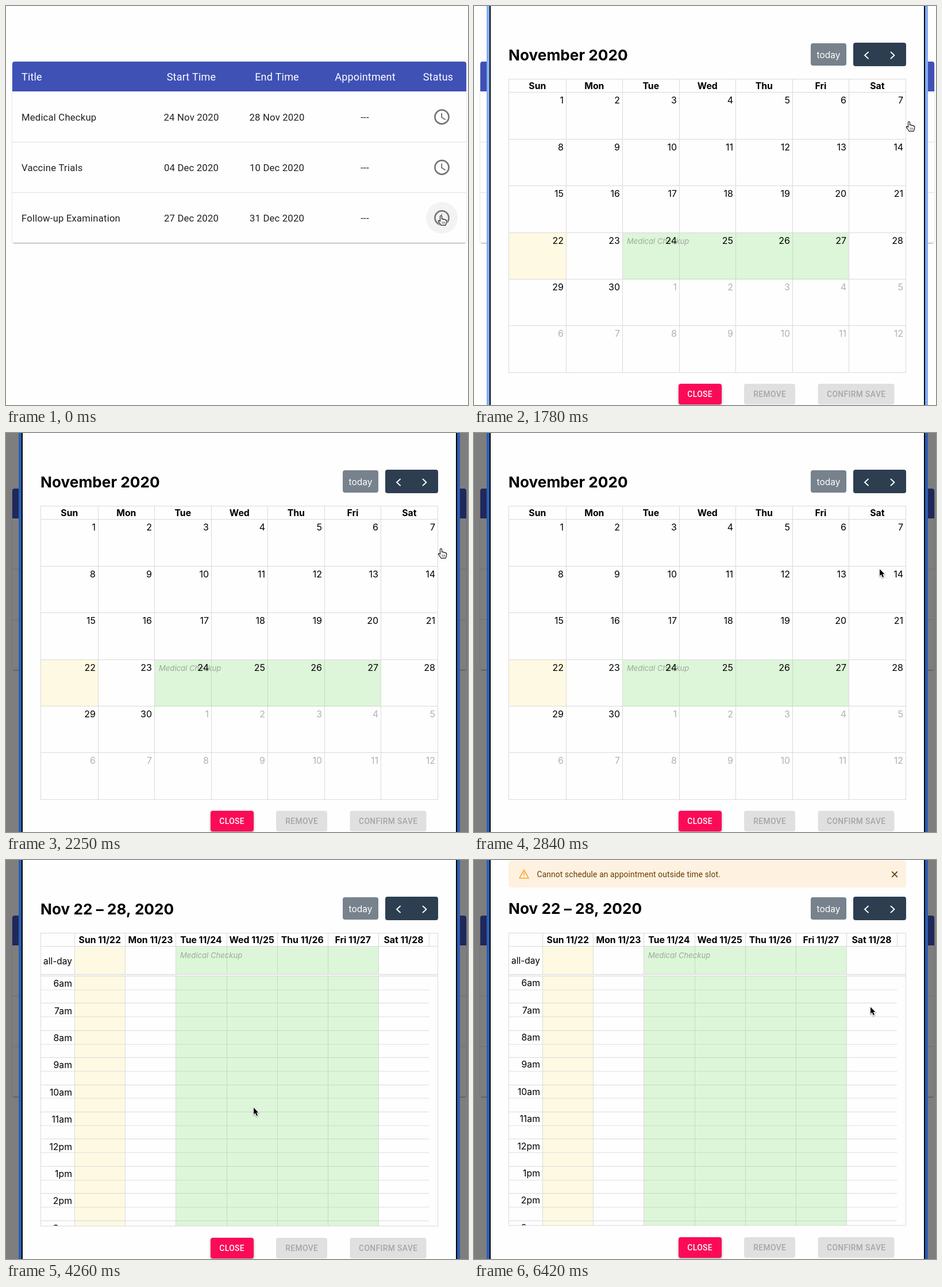
Write an HTML page with a canvas that moves like this. It is 804x696 px and loops after 8 s.

```html
<!DOCTYPE html>
<html lang="en">
<head>
<meta charset="utf-8">
<title>Appointment scheduler</title>
<style>
html, body { margin: 0; width: 100%; height: 100%; overflow: hidden; background: #fefefe; }
canvas { display: block; }
</style>
</head>
<body>
<canvas id="stage" width="804" height="696"></canvas>
<script>
const LOOP = 8000;
const ctx = document.getElementById('stage').getContext('2d');
const ROBOTO = 'Roboto, sans-serif';
const INTER = 'Inter, sans-serif';
const GRID = '#dadada';
const TODAY = '#fef9e2';
const EVENT = 'rgba(143, 223, 130, 0.3)';

const CLOCK_HANDS = new Path2D('M12.5 7H11v6l5.25 3.15.75-1.23-4.5-2.67z');
const ARROW = new Path2D('M0 0V11.7L2.7 9.2 4.9 14.2 7 13.3 4.9 8.4H8.4Z');
const HAND = new Path2D('M-1.5 10V1.5Q-1.5 0 0 0Q1.5 0 1.5 1.5V6.3Q4 5.3 4.5 6.9Q6.8 6.2 7.3 7.8' +
  'Q9.5 7.3 9.7 9V12Q9.2 14.5 8 16.8H0Q-1.2 14 -4.4 10.8Q-5.2 9 -3.8 8.7Q-2.6 8.8 -1.5 10Z');
const HAND_LINES = new Path2D('M2.2 11V14M4.4 11V14M6.6 11V14');

const lerp = (a, b, p) => a + (b - a) * p;
const smooth = p => p * p * (3 - 2 * p);

// Eased progress that advances in n equal jumps, the first one at start.
function stepped(t, start, end, n) {
  if (t < start) return 0;
  const k = 1 + Math.floor((t - start) / (end - start) * (n - 1) + 0.02);
  return smooth(Math.min(1, k / n));
}

function rect(x, y, w, h, color, radius = 0) {
  ctx.fillStyle = color;
  ctx.beginPath();
  ctx.roundRect(x, y, w, h, radius);
  ctx.fill();
}

const hLine = (x1, x2, y, color = GRID) => rect(x1, y, x2 - x1, 1, color);
const vLine = (x, y1, y2, color = GRID) => rect(x, y1, 1, y2 - y1, color);

// Text is placed by the vertical middle of its capitals.
function text(str, x, y, size, { font = INTER, style = '', color = '#000', align = 'left', spacing = 0 } = {}) {
  ctx.font = `${style} ${size}px ${font}`;
  ctx.letterSpacing = spacing * size + 'px';
  ctx.textAlign = align;
  ctx.fillStyle = color;
  ctx.fillText(str, x, y + size * 0.36);
}

function strokePath(path, color, width) {
  ctx.strokeStyle = color;
  ctx.lineWidth = width;
  ctx.lineJoin = ctx.lineCap = 'round';
  ctx.stroke(path);
}

function withShadow(color, blur, dy, draw) {
  ctx.save();
  ctx.shadowColor = color;
  ctx.shadowBlur = blur;
  ctx.shadowOffsetY = dy;
  draw();
  ctx.restore();
}

function drawClock(x, y) {
  ctx.save();
  ctx.translate(x, y);
  ctx.scale(1.34, 1.34);
  ctx.strokeStyle = ctx.fillStyle = '#757575';
  ctx.lineWidth = 2;
  ctx.beginPath();
  ctx.arc(0, 0, 9, 0, 7);
  ctx.stroke();
  ctx.translate(-12, -12);
  ctx.fill(CLOCK_HANDS);
  ctx.restore();
}

const ROWS = [
  ['Medical Checkup', '24 Nov 2020', '28 Nov 2020'],
  ['Vaccine Trials', '04 Dec 2020', '10 Dec 2020'],
  ['Follow-up Examination', '27 Dec 2020', '31 Dec 2020'],
];
const rowY = i => 193.5 + 88 * i;
const isOver = (cursor, i) => Math.abs(cursor.y - rowY(i)) < 27;

function drawTable(cursor) {
  withShadow('rgba(0,0,0,0.2)', 3, 1, () => rect(11, 97, 790, 316, '#fefefe', 4));
  hLine(13, 799, 413, '#a8a8a8');
  rect(11, 97, 790, 52, '#3f51b5', [4, 4, 0, 0]);
  const head = { font: ROBOTO, color: '#fff', spacing: 0.01 };
  text('Title', 27, 123.5, 18, head);
  [['Start Time', 322.5], ['End Time', 471.5], ['Appointment', 625], ['Status', 752]]
    .forEach(([label, x]) => text(label, x, 123.5, 18, { ...head, align: 'center' }));

  const cell = { font: ROBOTO, color: '#212121', spacing: 0.011 };
  ROWS.forEach(([title, start, end], i) => {
    const y = rowY(i);
    text(title, 27, y, 16.7, cell);
    [[start, 322.5], [end, 471.5], ['---', 624.5]]
      .forEach(([label, x]) => text(label, x, y, 16.7, { ...cell, align: 'center' }));
    if (i < 2) hLine(11, 801, y + 43.5, '#e0e0e0');
    if (isOver(cursor, i)) rect(731, y - 27.5, 55, 55, '#f3f3f3', 27.5);
    drawClock(758.5, y);
  });
}

function drawToolbar(title, shift) {
  text(title, 60, 85.5 - shift, 26.2, { style: 'bold' });
  rect(586, 65, 62, 39, '#77828d', 4);
  text('today', 617, 85, 15.5, { color: '#fff', align: 'center' });
  rect(660, 64, 92, 41, '#2c3e50', 4);
  strokePath(new Path2D('M686 80.5L680 86L686 91.5M725.5 80.5L731.5 86L725.5 91.5'), '#fff', 1.9);
}

function drawButtons(shift) {
  const y = 659 - shift;
  const label = { font: ROBOTO, style: '500', align: 'center', spacing: 0.0286 };
  withShadow('rgba(0,0,0,0.35)', 4, 2, () => rect(356, y, 75, 36, '#fb0a57', 4));
  text('CLOSE', 393.2, y + 18.3, 13.8, { ...label, color: '#fff' });
  [['REMOVE', 470, 89], ['CONFIRM SAVE', 598.5, 133]].forEach(([name, x, w]) => {
    rect(x, y, w, 36, '#e0e0e0', 4);
    text(name, x + w / 2 + 0.2, y + 18.3, 13.8, { ...label, color: '#a6a6a6' });
  });
}

function drawEventTitle(x, y) {
  text('Medical Checkup', x, y, 13.1, { style: 'italic', color: 'rgba(0,0,0,0.3)' });
}

const DAYS = ['Sun', 'Mon', 'Tue', 'Wed', 'Thu', 'Fri', 'Sat'];

function drawMonth() {
  const colX = i => i ? Math.round(61.4 + 98.5 * i) : 60;
  const lineY = i => Math.round(150.4 + 81.4 * i);
  drawToolbar('November 2020', 0);
  rect(60, lineY(3), 100, 82, TODAY);
  for (let i = 0; i < 8; i++) vLine(colX(i), 127, 639);
  hLine(60, 752, 127);
  for (let i = 0; i < 7; i++) hLine(60, 752, lineY(i));
  rect(259, lineY(3) + 1, 393, 81, EVENT);
  drawEventTitle(266, 410);
  DAYS.forEach((day, i) => text(day, (colX(i) + colX(i + 1)) / 2 + 0.3, 139.5, 15.8, { style: 'bold', align: 'center' }));
  for (let n = 0; n < 42; n++) {
    const color = n < 30 ? '#000' : '#b2b2b2';
    text(n % 30 + 1, colX(n % 7 + 1) - 4, lineY(Math.floor(n / 7)) + 14, 16, { color, align: 'right' });
  }
}

function drawWeek(shift) {
  const colX = i => Math.round(119 + 88.2 * i);
  const bottom = 638 - shift;
  drawToolbar('Nov 22 – 28, 2020', shift);
  rect(119, 151, 88, 49, TODAY);
  rect(119, 203, 88, bottom - 203, TODAY);

  for (const y of [127, 150, 199, 202]) hLine(60, 752, y);
  rect(61, 200, 690, 2, '#f6f6f6');
  hLine(60, 752, bottom);
  vLine(60, 127, bottom);
  vLine(751, 127, bottom);
  vLine(736, 127, 150);
  for (let i = 0; i < 7; i++) {
    vLine(colX(i), 127, 199);
    vLine(colX(i), 203, bottom);
  }

  ctx.save();
  ctx.beginPath();
  ctx.rect(60, 203, 692, bottom - 203);
  ctx.clip();
  const hours = ['6am', '7am', '8am', '9am', '10am', '11am', '12pm', '1pm', '2pm', '3pm'];
  hours.forEach((hour, i) => {
    const y = 202.5 + 47.4 * i;
    if (i) hLine(61, 736, Math.round(y - 0.5));
    ctx.strokeStyle = GRID;
    ctx.lineWidth = 1;
    ctx.setLineDash([1, 1]);
    ctx.beginPath();
    const half = Math.round(y + 23.2) + 0.5;
    ctx.moveTo(61, half);
    ctx.lineTo(736, half);
    ctx.stroke();
    ctx.setLineDash([]);
    text(hour, 115, y + 13 - shift, 15.8, { align: 'right' });
  });
  ctx.restore();

  rect(296, 151, 352, 48, EVENT);
  rect(296, 203, 352, bottom - 203, EVENT);
  drawEventTitle(303, 166.5);
  text('all-day', 115, 176 - shift, 15.5, { align: 'right' });
  DAYS.forEach((day, i) => text(`${day} 11/${22 + i}`, 163.3 + 88.1 * i, 139.5, 15.8, { style: 'bold', align: 'center' }));
}

function drawAlert() {
  rect(60, 1, 692, 47, '#fef1e0', 4);
  strokePath(new Path2D('M87 17.5L95 31.8H79Z'), '#ffa02b', 1.6);
  strokePath(new Path2D('M87 22.5V26.3M87 29V29.1'), '#ffa02b', 1.6);
  text('Cannot schedule an appointment outside time slot.', 109.5, 25, 13.8,
    { font: ROBOTO, color: '#663c00', spacing: 0.0107 });
  strokePath(new Path2D('M727.6 20.6L736.4 29.4M736.4 20.6L727.6 29.4'), '#663c00', 1.7);
}

function drawModal(t) {
  const dim = t < 1900 ? 0 : t < 2020 ? 0.3 : t < 2250 ? 0.45 : 0.5;
  rect(0, 0, 804, 696, `rgba(0,0,0,${dim})`);
  const ring = [[131, 44], [172, 94], [246, 178]].map(([a, b]) => Math.round(lerp(a, b, dim * 2)));
  rect(22, 0, 768, 696, `rgb(${ring})`);
  rect(27, 0, 758, 696, '#000');
  rect(29, 0, 754, 696, '#fefefe');
  const warned = t >= 6420;
  const shift = warned ? 1 : 0;
  if (t < 4260) drawMonth();
  else drawWeek(shift);
  if (warned) drawAlert();
  drawButtons(shift);
}

function drawCursor({ x, y }, isHand) {
  ctx.save();
  ctx.translate(x, y);
  if (isHand) {
    strokePath(HAND, '#fff', 2.6);
    ctx.fillStyle = '#fff';
    ctx.fill(HAND);
    strokePath(HAND, '#111', 1.2);
    strokePath(HAND_LINES, '#333', 0.8);
  } else {
    withShadow('rgba(0,0,0,0.4)', 2, 1, () => strokePath(ARROW, '#fff', 2.4));
    ctx.fillStyle = '#000';
    ctx.fill(ARROW);
  }
  ctx.restore();
}

function cursorAt(t) {
  if (t < 2610) return { x: 757, y: lerp(365.5, 201.5, stepped(t, 120, 940, 8)) };
  if (t < 5220) {
    const p = stepped(t, 2610, 3430, 8);
    return { x: lerp(757, 431, p), y: lerp(201.5, 432, p) };
  }
  const p = stepped(t, 5220, 5820, 6);
  return { x: lerp(431, 690, p), y: lerp(432, 256.5, p) };
}

function frame() {
  const t = performance.now() % LOOP;
  const cursor = cursorAt(t);
  const isOpen = t >= 1780;
  rect(0, 0, 804, 696, '#fefefe');
  drawTable(isOpen ? { y: -100 } : cursor);
  if (isOpen) drawModal(t);
  drawCursor(cursor, isOpen ? t < 2610 : ROWS.some((_, i) => isOver(cursor, i)));
  requestAnimationFrame(frame);
}
frame();
</script>
</body>
</html>
```
